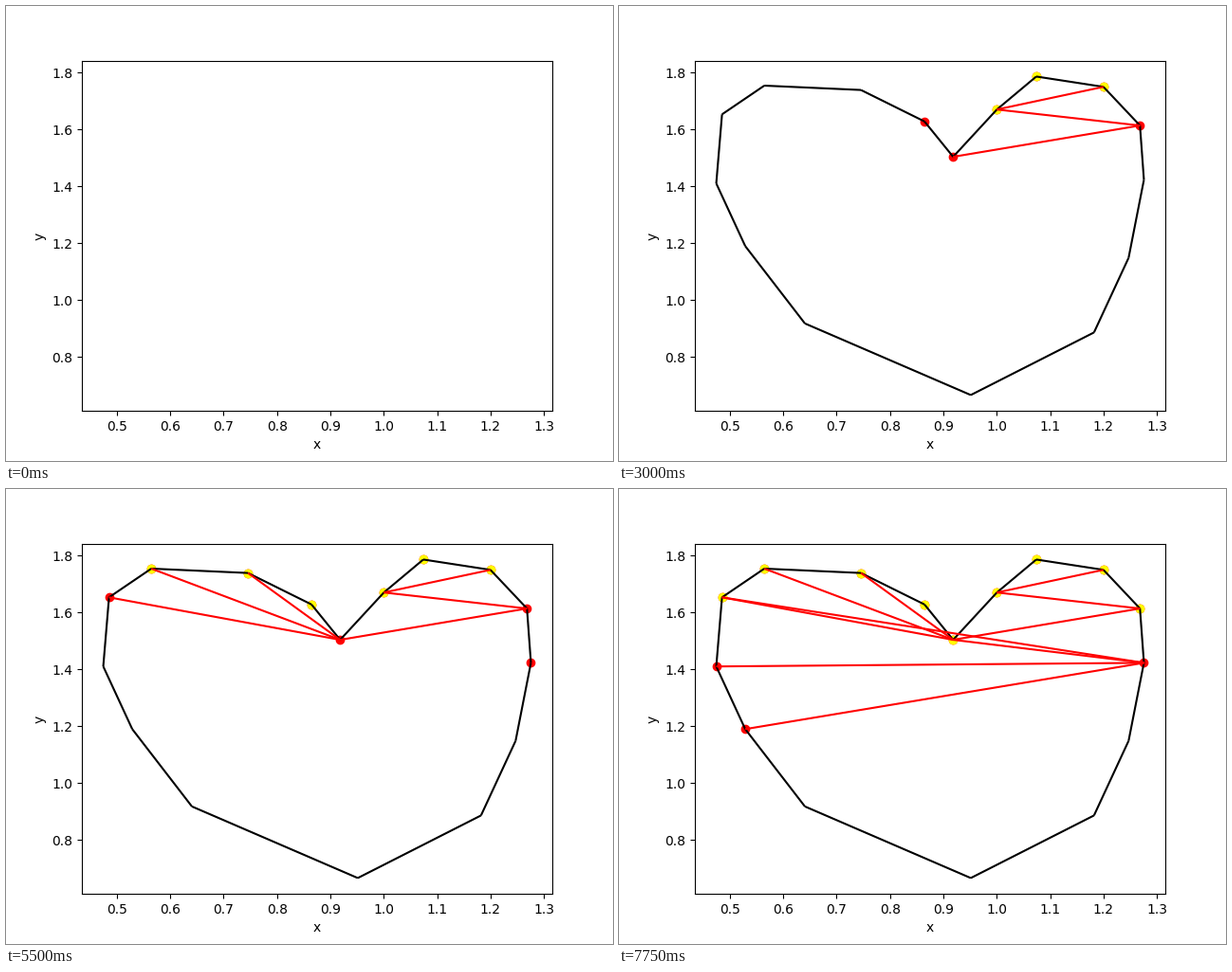
Write a matplotlib script that moves like this. It is 640 px wide and 480 px high and loops after 8 s.

```python
from itertools import islice

import matplotlib.pyplot as plt
from matplotlib.animation import FuncAnimation
from matplotlib.collections import LineCollection

FRAMES = 32

# Polygon corners, counter-clockwise from the top
POINTS = [
    (1.0740, 1.7862), (1.0002, 1.6702), (0.9183, 1.5039), (0.8646, 1.6282),
    (0.7456, 1.7389), (0.5646, 1.7542), (0.4854, 1.6532), (0.4746, 1.4102),
    (0.5289, 1.1899), (0.6406, 0.9179), (0.9513, 0.6662), (1.1821, 0.8862),
    (1.2469, 1.1485), (1.2756, 1.4229), (1.2682, 1.6139), (1.1998, 1.7499),
]
BOTTOM = min(range(len(POINTS)), key=lambda i: POINTS[i][1])


def is_left(i):
    return i <= BOTTOM


def merge_chains():
    """Walk down both sides of the polygon, always taking the higher head."""
    left = list(range(1, BOTTOM + 1))
    right = list(range(len(POINTS) - 1, BOTTOM, -1))
    yield 0
    while left or right:
        heads = [chain for chain in (left, right) if chain]
        yield max(heads, key=lambda chain: POINTS[chain[0]][1]).pop(0)


def inside(a, b, c):
    """Whether the triangle of three corners of one chain lies inside."""
    (ax_, ay), (bx, by), (cx, cy) = (POINTS[i] for i in (a, b, c))
    turn = (bx - ax_) * (cy - by) - (by - ay) * (cx - bx)
    return turn > 0 if is_left(c) else turn < 0


def triangulate():
    """Yield one drawing action per frame."""
    yield "outline", range(len(POINTS))
    order = list(merge_chains())
    stack = order[:2]
    yield "visit", stack[:]
    for i in order[2:]:
        yield "visit", [i]
        if is_left(i) != is_left(stack[-1]):
            for j in stack[:0:-1]:
                yield "cut", [i, j]
            for j in stack[-2::-1]:
                yield "retire", [j]
            stack = [stack[-1]]
        else:
            while len(stack) > 1 and inside(stack[-2], stack[-1], i):
                yield "cut", [i, stack[-2]]
                yield "retire", [stack.pop()]
        stack.append(i)


fig, ax = plt.subplots(figsize=(6.4, 4.8), dpi=100)
ax.set_xlabel("x")
ax.set_ylabel("y")


def add_lines(segments, color):
    return ax.add_collection(LineCollection(segments, colors=color, linewidths=1.5))


def make_artist(action, ids):
    corners = [POINTS[i] for i in ids]
    if action == "outline":
        return add_lines(list(zip(corners, corners[1:] + corners[:1])), "black")
    if action == "cut":
        return add_lines([corners], "red")
    return ax.scatter(*zip(*corners), c="red" if action == "visit" else "yellow")


artists = [make_artist(*step) for step in islice(triangulate(), FRAMES - 1)]
ax.autoscale_view()


def update(frame):
    for i, artist in enumerate(artists):
        artist.set_visible(i < frame)
    return artists


anim = FuncAnimation(fig, update, frames=FRAMES, interval=250,
                     repeat=True, repeat_delay=0)
plt.show()
```
